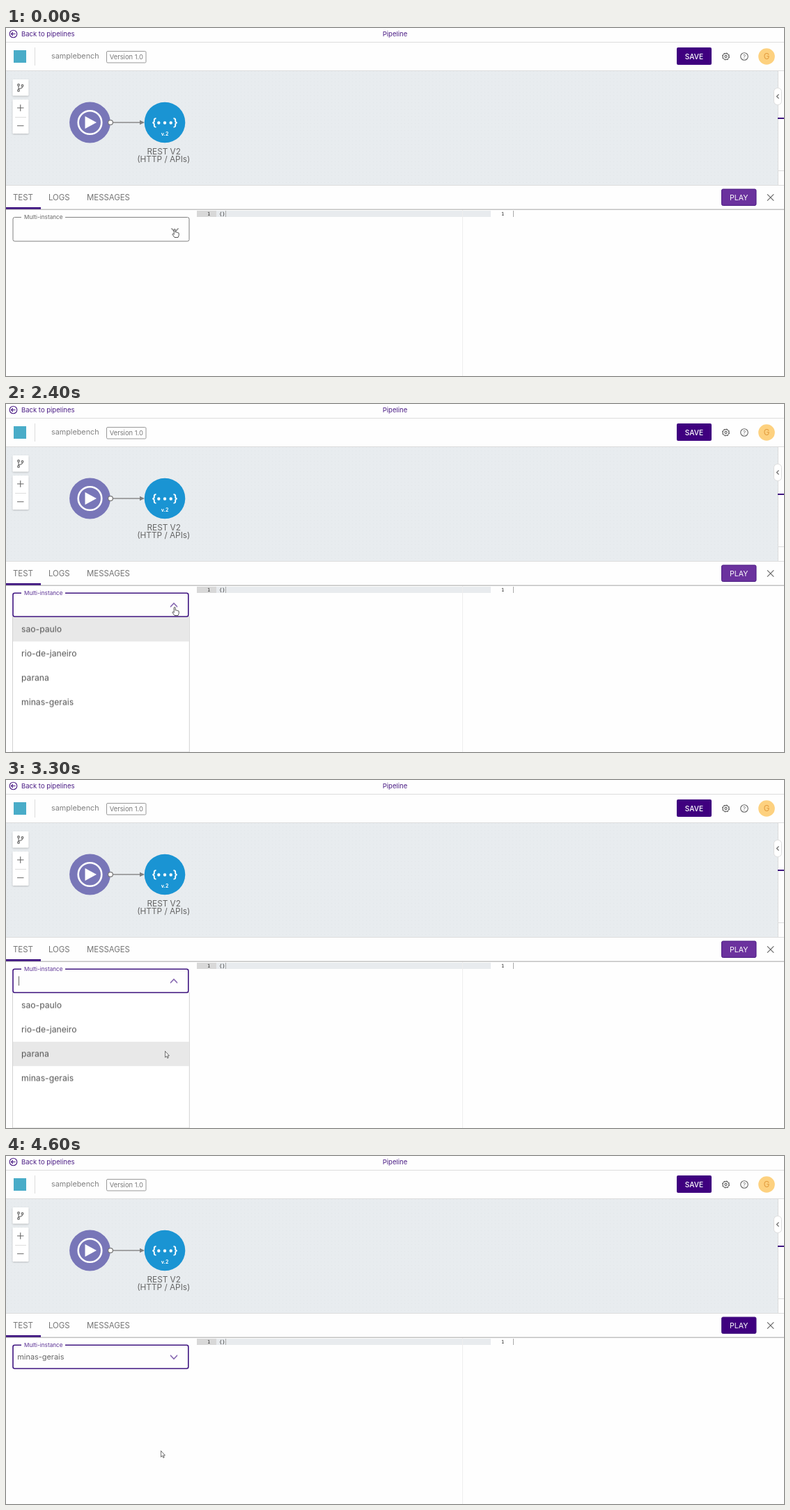
An HTML page that plays this animation: 1117x501 px, repeating every 8000 ms.

```html
<!DOCTYPE html>
<html lang="en">
<head>
<meta charset="utf-8">
<title>Pipeline</title>
<style>
html, body { margin: 0; width: 100%; height: 100%; overflow: hidden; background: #fefefe; }
svg { display: block; width: 100%; height: 100%; }
text { font-family: Inter, "Open Sans", sans-serif; fill: #666; }
.mid { text-anchor: middle; }
.purple { fill: #4b1d85; }
.white { fill: #fff; }
.code { font: 7px "DejaVu Sans Mono", monospace; fill: #333; }
.tab { font-size: 11.4px; fill: #757575; }
.node { font-size: 11.8px; }
.item { font-size: 12.2px; fill: #555; }
.icon { fill: none; stroke: #666; stroke-width: 1.1; }
.line { stroke: #ddd; }
.card { fill: #fff; filter: drop-shadow(0 1px 1px #0003); }

/* All state changes are hard cuts on one shared 8 s clock. */
.cursor, .hand, .arrow, .idle, .focus, .label, .menu, .list, .hover,
.caret, .chevron, .play, .chosen { animation: 8s step-end infinite; }

.cursor { animation-name: cursor; }
@keyframes cursor {
  0% { transform: translate(242px, 289px); }
  2.5% { transform: translate(242px, 291px); }
  3.75% { transform: translate(242px, 292px); }
  32.5% { transform: translate(241px, 299px); }
  33.75% { transform: translate(240px, 317px); }
  35% { transform: translate(239px, 329px); }
  36.25% { transform: translate(238px, 333px); }
  38.75% { transform: translate(236px, 347px); }
  40% { transform: translate(232px, 371px); }
  41.25% { transform: translate(228px, 390px); }
  42.5% { transform: translate(227px, 396px); }
  43.75% { transform: translate(226px, 403px); }
  45% { transform: translate(224px, 411px); }
  46.25% { transform: translate(223px, 419px); }
  47.5%, 100% { transform: translate(222px, 424px); }
}
.hand { animation-name: hand; }
@keyframes hand { 0% { opacity: 1; } 33.75%, 100% { opacity: 0; } }
.arrow { animation-name: arrow; }
@keyframes arrow { 0% { opacity: 0; } 33.75%, 100% { opacity: 1; } }

.idle { animation-name: idle; }
@keyframes idle { 0% { opacity: 1; } 25%, 100% { opacity: 0; } }
.focus { animation-name: focus; }
@keyframes focus { 0% { opacity: 0; } 25%, 100% { opacity: 1; } }
.label { font-size: 8.2px; animation-name: label; }
@keyframes label { 0% { fill: #666; } 25%, 100% { fill: #5b3195; } }

.menu { animation-name: menu; }
@keyframes menu { 0% { opacity: 0; } 23.75% { opacity: 1; } 55%, 100% { opacity: 0; } }
.list { animation-name: list; }
@keyframes list { 0% { transform: translateY(.6px); } 25%, 100% { transform: none; } }
.hover { animation-name: hover; }
@keyframes hover {
  0% { transform: none; }
  38.75% { transform: translateY(35px); }
  41.25% { transform: translateY(70px); }
  46.25%, 100% { transform: translateY(105px); }
}
.caret { animation-name: caret; }
@keyframes caret {
  0% { opacity: 0; }
  23.75% { opacity: 1; }
  30% { opacity: 0; }
  36.25% { opacity: 1; }
  42.5% { opacity: 0; }
  50% { opacity: 1; }
  55%, 100% { opacity: 0; }
}
.chevron { fill: none; stroke-width: 1.2; animation-name: chevron; }
@keyframes chevron {
  0% { stroke: #666; transform: translate(242.5px, 291px); }
  23.75% { stroke: #5b3195; transform: translate(242px, 290.5px) scaleY(-1); }
  25% { stroke: #5b3195; transform: translate(241px, 289.5px) scaleY(-1); }
  55%, 100% { stroke: #5b3195; transform: translate(241px, 289.5px); }
}
.play { stroke: #4a1a83; animation-name: play; }
@keyframes play {
  0% { fill: #6b329e; }
  55% { fill: #5e2295; }
  56.25% { fill: #4e1089; }
  57.5%, 100% { fill: #3f007f; }
}
.chosen { font-size: 10.9px; animation-name: chosen; }
@keyframes chosen { 0% { opacity: 0; } 55%, 100% { opacity: 1; } }
</style>
</head>
<body>
<svg viewBox="0 0 1117 501">
  <defs>
    <pattern id="dots" width="5" height="5" patternUnits="userSpaceOnUse">
      <rect x="2" y="2" width="1" height="1" fill="#e1e6e9"/>
    </pattern>
  </defs>
  <rect width="1117" height="501" fill="#fefefe"/>

  <!-- top bar -->
  <g class="icon" style="stroke:#4b1d85">
    <circle cx="10.5" cy="8.5" r="5.3"/>
    <path d="M13.5 8.5H8M10 6 7.5 8.5 10 11"/>
  </g>
  <text class="purple" x="22" y="12.3" font-size="9.5">Back to pipelines</text>
  <text class="mid purple" x="558.5" y="12.3" font-size="9.5">Pipeline</text>
  <path class="line" d="M0 20.5H1117"/>

  <!-- header -->
  <rect x="11" y="32" width="18" height="18" fill="#49acc8"/>
  <path class="line" d="M41.5 28V54"/>
  <text x="65" y="44.3" font-size="10.8" style="fill:#808080">samplebench</text>
  <rect class="icon" x="144.5" y="33.5" width="56.5" height="16.5" rx="1.5" style="stroke:#999;stroke-width:1"/>
  <text class="mid" x="172.8" y="45.2" font-size="9.4" style="fill:#777">Version 1.0</text>
  <rect x="963" y="28" width="50" height="25" rx="2" fill="#3f007f"/>
  <text class="mid white" x="988" y="44.6" font-size="10.2" font-weight="500">SAVE</text>
  <g class="icon">
    <circle cx="1033.5" cy="41" r="4.4"/>
    <circle cx="1033.5" cy="41" r="5" stroke-dasharray="2 1.93"/>
    <circle cx="1033.5" cy="41" r="1.6"/>
    <circle cx="1060" cy="41" r="5.3"/>
  </g>
  <text class="mid" x="1060" y="44" font-size="8">?</text>
  <circle cx="1092" cy="41" r="11.8" fill="#fdd17f"/>
  <text class="mid" x="1092" y="45.2" font-size="11.5" style="fill:#e29a3c">G</text>

  <!-- pipeline canvas -->
  <rect y="61" width="1108" height="165" fill="#e8ecef"/>
  <rect y="61" width="1108" height="165" fill="url(#dots)"/>
  <path class="line" d="M0 61.5H1117M1108.5 62V226M1109 205.5H1117M0 226.5H1117"/>
  <rect x="1108" y="129" width="9" height="2" fill="#3f1580"/>
  <rect x="1102.5" y="86.5" width="11" height="24" rx="5" fill="#fff" stroke="#ddd"/>
  <path class="icon" d="M1109.5 95.5 1106.5 98.5 1109.5 101.5"/>

  <rect class="card" x="9.5" y="74" width="23" height="23.5" rx="1"/>
  <rect class="card" x="9.5" y="103" width="23" height="49" rx="1"/>
  <path class="line" d="M13 128.5H29"/>
  <g class="icon">
    <circle cx="18" cy="82" r="1.4"/>
    <circle cx="18" cy="90" r="1.4"/>
    <circle cx="23.5" cy="83" r="1.4"/>
    <path d="M18 83.4V88.6M23.5 84.4Q23.5 87 18 87.5M16 115H25.5M20.75 110.3V119.7M16 140.7H25.5"/>
  </g>

  <circle cx="120.5" cy="136" r="29.4" fill="#7876b8"/>
  <circle cx="120.5" cy="136" r="16.8" fill="none" stroke="#fff" stroke-width="2.6"/>
  <path d="M113.5 127V145L130 136Z" fill="#fff"/>
  <path d="M153 136H193" stroke="#8a8a8a" stroke-width="1.4"/>
  <path d="M192 132.8V139.2L199 136Z" fill="#808080"/>
  <circle cx="150" cy="136" r="3.4" fill="#fff" stroke="#777" stroke-width="1.2"/>
  <circle cx="228" cy="136" r="29.3" fill="#1a94d3"/>
  <g fill="none" stroke="#fff" stroke-width="1.9">
    <path id="brace" d="M215.5 130.2Q212.7 130 212.8 132.5V134Q212.8 136.3 210.3 136.4Q212.8 136.5 212.8 138.8V140.3Q212.7 142.8 215.5 142.6"/>
    <use href="#brace" transform="matrix(-1 0 0 1 456 0)"/>
  </g>
  <path d="M219.3 136.5h0M228 136.5h0M236.7 136.5h0" stroke="#fff" stroke-width="4.4" stroke-linecap="round"/>
  <text class="mid white" x="228" y="155" font-size="7" font-weight="700">v.2</text>
  <text class="mid node" x="226.7" y="182">REST V2</text>
  <text class="mid node" x="226.3" y="193.3">(HTTP / APIs)</text>

  <!-- test panel -->
  <path d="M0 261.2H1117" stroke="#a5a5a5"/>
  <rect y="258" width="50" height="2.8" fill="#3f1580"/>
  <text class="tab" x="10" y="248">TEST</text>
  <text class="tab" x="61" y="248">LOGS</text>
  <text class="tab" x="116" y="248">MESSAGES</text>
  <rect class="play" x="1027.5" y="232" width="49.5" height="23.5" rx="2"/>
  <text class="mid white" x="1052.3" y="247.8" font-size="10.6">PLAY</text>
  <path class="icon" d="M1093 239.3 1102.3 248.6M1102.3 239.3 1093 248.6"/>

  <!-- editors -->
  <rect x="274" y="263" width="422" height="9" fill="#e8ebee"/>
  <rect x="274" y="263" width="28" height="9" fill="#d8d8d8"/>
  <path d="M655.5 262V501" stroke="#eee"/>
  <text class="code" x="289" y="270">1</text>
  <text class="code" x="306" y="270">{}</text>
  <text class="code" x="711" y="270">1</text>
  <path d="M315.5 263V272M728.5 263V272" stroke="#aaa"/>

  <!-- instance list -->
  <g class="menu">
    <path d="M9.5 306V501H263.3V306Z" fill="#fff" stroke="#d2d2d2"/>
    <g class="list">
      <rect class="hover" x="10" y="306.8" width="253" height="35" fill="#e8e8e8"/>
      <text class="item" x="22" y="328.4">sao-paulo</text>
      <text class="item" x="22" y="363.4">rio-de-janeiro</text>
      <text class="item" x="22" y="398.4">parana</text>
      <text class="item" x="22" y="433.4">minas-gerais</text>
    </g>
  </g>

  <!-- instance field -->
  <rect class="idle" x="10" y="272.5" width="253" height="34.5" rx="2.5" fill="#fefefe" stroke="#808080"/>
  <rect class="focus" x="10" y="272.3" width="251.8" height="33.7" rx="2.5" fill="#fefefe" stroke="#3f1580" stroke-width="1.6"/>
  <rect x="22" y="270" width="63" height="5" fill="#fefefe"/>
  <text class="label" x="26" y="275.4">Multi-instance</text>
  <path class="caret" d="M18.5 282.5V296" stroke="#666"/>
  <text class="chosen" x="16.3" y="293">minas-gerais</text>
  <path class="chevron" d="M-5 -2.6 0 2.6 5 -2.6"/>

  <!-- pointer -->
  <g class="cursor" fill="#fff" stroke="#444" stroke-linejoin="round">
    <path class="hand" stroke-width=".9" d="M-.8 1Q.2 -.4 1.2 1V5Q2.3 4.3 3 5.3Q4.2 4.7 4.8 5.8Q6.2 5.4 6.2 7V9.5L5 12.5H0L-3 8.3Q-3 6.8 -1.8 7.3L-.8 8.3Z"/>
    <path class="arrow" stroke-width=".8" d="M.4 .4V9.3L2.4 7.5 3.8 10.5 5.2 9.9 3.9 7H6.4Z"/>
  </g>
</svg>
</body>
</html>
```
